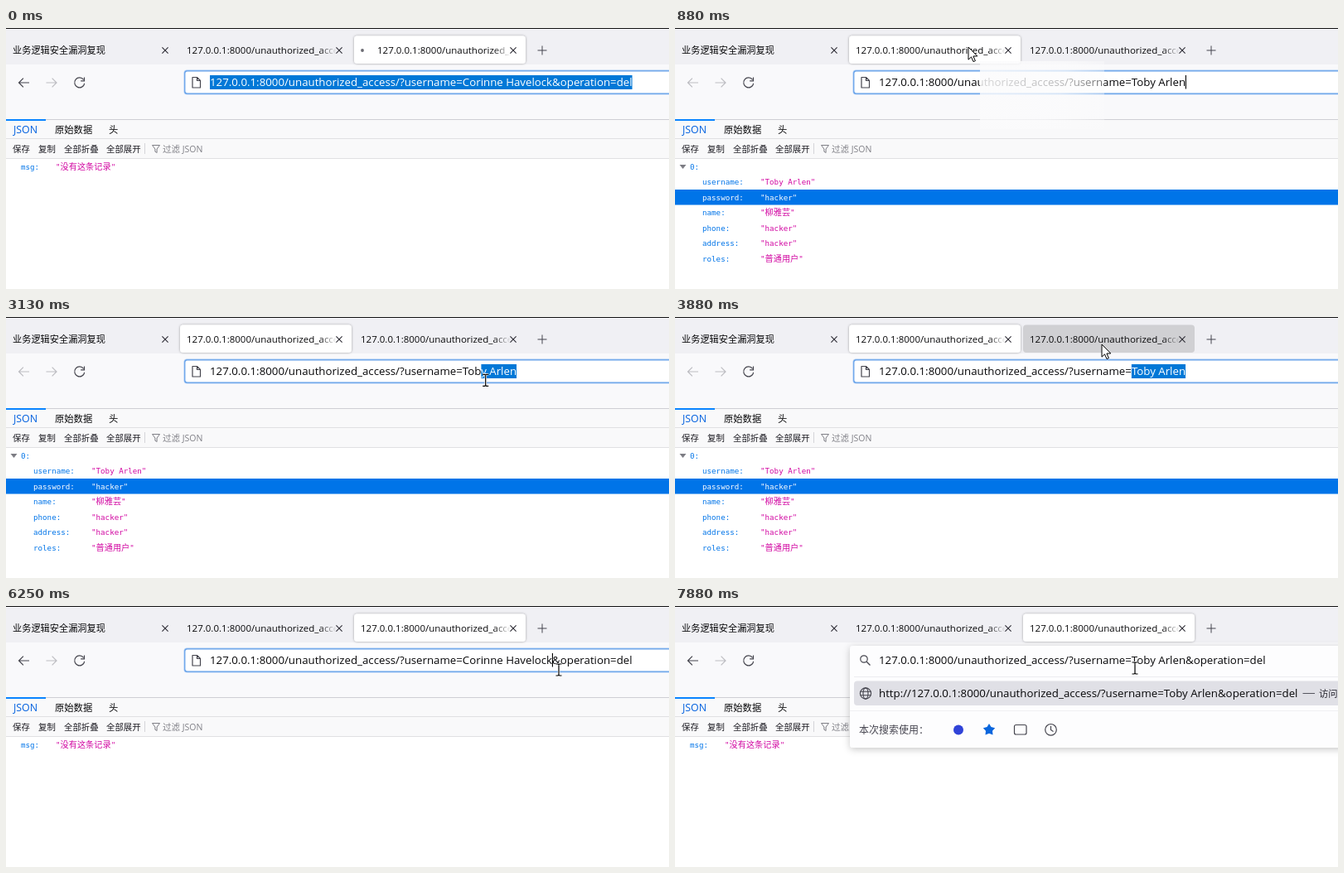
These frames come from a looping animation (800 px wide and 315 px high, 8 s). An HTML page:

```html
<!DOCTYPE html>
<html lang="zh">
<head>
<meta charset="utf-8">
<title>Browser session</title>
<style>
html, body { margin: 0; width: 100%; height: 100%; overflow: hidden; background: #fff; }
svg { display: block; width: 800px; height: 315px; }
text { font-family: "Open Sans", "Noto Sans CJK SC", "Noto Sans CJK", sans-serif; white-space: pre; }
.mono { font-family: "DejaVu Sans Mono", "Noto Sans CJK SC", "Noto Sans CJK", monospace; }
</style>
</head>
<body>
<svg id="stage" viewBox="0 0 800 315" xmlns="http://www.w3.org/2000/svg"></svg>
<script>
const LOOP = 8000, STEP = 125;
const INK = '#08080a', ICON = '#45454e', GREY = '#74747c', BLUE = '#0078d7', KEY = '#0074e8', STR = '#d208a2';
const USER = 'Toby Arlen', OTHER = 'Corinne Havelock', FULL_NAME = '柳雅芸';
const HOST = '127.0.0.1', BASE = HOST + ':8000/unauthorized_access/?username=', OP = '&operation=del';
const URL_X = 246, URL_SIZE = 13.28;

const stage = document.getElementById('stage');
const pen = document.createElement('canvas').getContext('2d');
const widthOf = s => {
  pen.font = `${URL_SIZE}px "Open Sans", sans-serif`;
  return pen.measureText(s).width;
};
const esc = s => s.replace(/&/g, '&amp;').replace(/</g, '&lt;');

const rect = (x, y, w, h, fill, extra = '') =>
  `<rect x="${x}" y="${y}" width="${w}" height="${h}" fill="${fill}" ${extra}/>`;
const line = (d, color, w = 1.1, extra = '') =>
  `<path d="${d}" fill="none" stroke="${color}" stroke-width="${w}" ${extra}/>`;
const label = (x, y, size, s, fill = INK, extra = '') =>
  `<text x="${x}" y="${y}" font-size="${size}" fill="${fill}" ${extra}>${esc(s)}</text>`;
const span = (s, fill) => `<tspan fill="${fill}">${esc(s)}</tspan>`;

const DEFS = `<defs>
  <linearGradient id="fade2" gradientUnits="userSpaceOnUse" x1="378" x2="399">
    <stop offset="0" stop-color="${INK}"/><stop offset="1" stop-color="${INK}" stop-opacity="0"/></linearGradient>
  <linearGradient id="fade3" gradientUnits="userSpaceOnUse" x1="588" x2="609">
    <stop offset="0" stop-color="${INK}"/><stop offset="1" stop-color="${INK}" stop-opacity="0"/></linearGradient>
  <radialGradient id="ghost" gradientUnits="userSpaceOnUse" cx="378" cy="48" r="155">
    <stop offset="0" stop-color="#fbfbfc" stop-opacity=".86"/><stop offset=".6" stop-color="#fbfbfc" stop-opacity=".72"/>
    <stop offset="1" stop-color="#fbfbfc" stop-opacity=".3"/></radialGradient>
  <filter id="shade" x="-5%" y="-20%" width="110%" height="140%">
    <feDropShadow dx="0" dy="0" stdDeviation="1.6" flood-color="#000" flood-opacity=".35"/></filter>
  <filter id="drop" x="-5%" y="-20%" width="110%" height="140%">
    <feDropShadow dx="0" dy="2" stdDeviation="4" flood-color="#000" flood-opacity=".22"/></filter>
</defs>`;

const cross = x => line(`M${x - 3.6} 23.4l7.2 7.2m0-7.2l-7.2 7.2`, '#2b2a33', 1.1);

function tabs(active, hover, loading) {
  let out = '';
  [2, 3].forEach(n => {
    const x = n === 2 ? 210 : 420;
    if (n === active) out += rect(x, 9.5, 207, 33.5, '#fff', 'rx="4" filter="url(#shade)"');
    else if (n === hover) out += rect(x, 9.5, 207, 33.5, '#d0d0d3', 'rx="4"');
    const shift = n === 3 && loading ? 28 : 8;
    out += label(x + shift, 31, 11.5, HOST + ':8000/unauthorized_access', `url(#fade${n})`);
    out += cross(x + 192);
  });
  if (loading) out += '<circle cx="430" cy="27" r="1.9" fill="#6a6a72"/>';
  return label(8, 31, 11.2, '业务逻辑安全漏洞复现') + cross(192) + out +
    line('M641.5 27h11m-5.5-5.5v11', ICON, 1);
}

function navIcons(canGoBack) {
  const dim = '#bdbdc2';
  return line('M28 66H15.5m5.4-5.4L15.5 66l5.4 5.4', canGoBack ? ICON : dim, 1.2) +
    line('M48.5 66H61m-5.4-5.4L61 66l-5.4 5.4', dim, 1.2) +
    line('M93.6 62.3A6 6 0 1 0 94.7 66.8M94.5 59.5v4.3h-4.3', ICON, 1.2);
}

const docIcon = line('M225 59.5h5.5l4 4v8.5h-9.5zM230.5 59.5v4h4', ICON, 1.2, 'stroke-linejoin="round"');
const lens = `<circle cx="228" cy="64" r="4.2" fill="none" stroke="${ICON}" stroke-width="1.2"/>` +
  line('M231.2 67.2l4.3 4.3', ICON, 1.3);

// from/to: selected range, caret: character index
function address({ url, from = 0, to = 0, caret = -1, focus }) {
  const at = i => URL_X + widthOf(url.slice(0, i));
  let out = '', body;
  if (to > from) out += rect(at(from), 57, at(to) - at(from), 17, BLUE);
  if (focus) body = span(url.slice(0, from), INK) + span(url.slice(from, to), '#fff') + span(url.slice(to), INK);
  else body = span(HOST, INK) + span(url.slice(HOST.length), GREY);
  out += `<text x="${URL_X}" y="70" font-size="${URL_SIZE}">${body}</text>`;
  if (caret >= 0) out += rect(at(caret) - .2, 57, 1.1, 16.5, '#000');
  return out;
}

const bar = focus => focus
  ? rect(214.5, 50.5, 600, 30, '#a9cbf5', 'rx="4"') +
    rect(215.8, 51.8, 600, 27.4, '#fff', 'rx="3" stroke="#5f9de8" stroke-width="1.2"')
  : rect(215, 51, 600, 29, '#f0f0f4', 'rx="4"');

function panel() {
  const url = 'http://' + BASE + USER + OP;
  const star = Array.from({ length: 10 }, (_, i) => {
    const r = i % 2 ? 4.2 : 7.6, a = i * Math.PI / 5 - Math.PI / 2;
    return `${(379 + r * Math.cos(a)).toFixed(1)},${(149.5 + r * Math.sin(a)).toFixed(1)}`;
  }).join(' ');
  return rect(211, 48, 620, 123, '#fdfdfe', 'rx="4" filter="url(#drop)"') +
    rect(216, 85, 590, 1, '#ececf0') +
    rect(216, 90.5, 600, 29.5, '#e0e0e6', 'rx="4"') + rect(211, 126, 620, 1, '#f0f0f3') +
    lens +
    `<g fill="none" stroke="${ICON}" stroke-width="1.1"><circle cx="230" cy="105.5" r="6.6"/>` +
    '<ellipse cx="230" cy="105.5" rx="3" ry="6.6"/><path d="M223.6 103.3h12.8m-12.8 4.4h12.8"/></g>' +
    label(URL_X, 110, URL_SIZE, url) +
    rect(757.5, 105, 14.5, 1, '#55555f') + label(777, 109.5, 11.3, '访问', '#2b2a33') +
    label(222, 154, 12, '本次搜索使用：', '#45444f') +
    '<circle cx="342" cy="149.5" r="6" fill="#3043d8"/>' +
    `<polygon points="${star}" fill="#0a66dd"/>` +
    `<g fill="none" stroke="${ICON}" stroke-width="1.2"><rect x="409.5" y="143.5" width="14.5" height="11.5" rx="2"/>` +
    '<circle cx="453.5" cy="149.3" r="6.8"/><path d="M453.5 144.8v4.7l3 2"/></g>';
}

const viewer = rect(0, 110, 800, 47, '#f9f9fa') + rect(0, 110, 800, 1, '#cfcfd4') +
  rect(0, 110, 48, 2, '#0a84ff') + rect(0, 133, 800, 1, '#e0e0e2') + rect(0, 157, 800, 1, '#e0e0e2') +
  label(9, 127, 12.4, 'JSON', '#0060df') + label(59, 127, 11.3, '原始数据') + label(124, 127, 11.3, '头') +
  [[8, '保存'], [39, '复制'], [70, '全部折叠'], [121, '全部展开']].map(([x, s]) => label(x, 149.5, 10.4, s, '#1c1b22')).join('') +
  rect(167, 139, 1, 13, '#d5d5d9') +
  line('M176.5 141.5h9l-3.4 4.5v4.5l-2.2-1.3v-3.2z', '#808087', 1, 'stroke-linejoin="round"') +
  label(189, 149.5, 10.5, '过滤 JSON', '#808087');

const mono = (x, y, s, fill, cjk) =>
  `<text class="mono" x="${x}" y="${y}" font-size="9.2" fill="${fill}">` +
  (cjk ? `"<tspan font-size="10.2">${s}</tspan>"` : esc(s)) + '</text>';

const message = mono(18, 170.5, 'msg:', KEY) + mono(60, 170.5, '没有这条记录', STR, true);

const record = '<path d="M5.5 165h8l-4 5z" fill="#7d7d84"/>' + mono(18, 170.5, '0:', KEY) +
  [['username', USER], ['password', 'hacker'], ['name', FULL_NAME], ['phone', 'hacker'], ['address', 'hacker'], ['roles', '普通用户']]
    .map(([key, value], i) => {
      const y = 189 + i * 18.5, chosen = i === 1, cjk = value.charCodeAt(0) > 255;
      return (chosen ? rect(0, 195, 800, 18.5, '#0074e8') : '') +
        mono(33, y, key + ':', chosen ? '#fff' : KEY) +
        mono(103, y, cjk ? value : `"${value}"`, chosen ? '#fff' : STR, cjk);
    }).join('');

// step, x, y of the pointer's hot spot
const PATH = [
  [2, 470, 70], [5, 354, 23], [14, 354, 23], [17, 436, 51], [21, 609, 73], [22, 609, 73],
  [23, 638, 77], [26, 549, 76], [27, 549, 76], [31, 515, 33], [34, 515, 33], [40, 637, 76],
  [41, 641, 76], [48, 667, 77], [51, 667, 77], [55, 555, 75], [64, 555, 75]
];

function pointerAt(k) {
  const i = PATH.findIndex(p => p[0] > k);
  const [a, x, y] = PATH[i - 1], [b, u, v] = PATH[i], f = (k - a) / (b - a);
  return [x + (u - x) * f, y + (v - y) * f];
}

function pointer(x, y) {
  const beam = 'M-3.5-7h2.5l1 .8 1-.8h2.5M0-6.5v13M-3.5 7h2.5l1-.8 1 .8h2.5';
  const shape = y > 53
    ? line(beam, '#fff', 2.6) + line(beam, '#000', 1.2)
    : '<path d="M0 0v15.2l3.5-3.3 2.5 5.7 2.4-1-2.5-5.6h4.9z" fill="#fff" stroke="#000" stroke-width="1"/>';
  return `<g transform="translate(${x.toFixed(1)} ${y.toFixed(1)})">${shape}</g>`;
}

function urlState(k, x) {
  const mine = BASE + USER, theirs = BASE + OTHER + OP, start = BASE.length;
  const dragFrom = (url, end) => {
    let i = end;
    while (i > start && URL_X + widthOf(url.slice(0, i - 1)) > x - 8) i--;
    return i;
  };
  if (k < 5) return { url: theirs, to: theirs.length, focus: true };
  if (k < 23) {
    const on = k < 10 || (k >= 15 && k < 19);
    return { url: mine, caret: on ? mine.length : -1, focus: true };
  }
  if (k < 32) {
    const from = k > 25 ? start : dragFrom(mine, mine.length);
    return { url: mine, from, to: mine.length, focus: true };
  }
  if (k < 50) return { url: theirs, focus: false };
  if (k < 59) {
    const end = start + OTHER.length;
    if (k < 52) return { url: theirs, caret: end, focus: true };
    return { url: theirs, from: k > 54 ? start : dragFrom(theirs, end), to: end, focus: true };
  }
  return { url: mine + OP, caret: k < 62 ? mine.length : -1, focus: true };
}

function draw(k) {
  const [x, y] = k < 2 ? [0, 0] : pointerAt(k);
  const onSecond = k >= 5 && k < 32, open = k >= 60;
  const hover = k === 4 ? 2 : k >= 30 && k < 32 ? 3 : 0;
  const state = urlState(k, x);
  stage.innerHTML = DEFS + rect(0, 0, 800, 315, '#fff') + rect(0, 0, 800, 44, '#f0f0f4') +
    rect(0, 44, 800, 66, '#f9f9fb') + rect(0, 0, 800, 1, '#111') +
    tabs(onSecond ? 2 : 3, hover, k < 1) + navIcons(!onSecond) +
    viewer + (onSecond ? record : message) +
    (open ? panel() : bar(state.focus) + docIcon) + address(state) +
    (k >= 6 && k < 10 ? rect(368, 40, 150, 82, 'url(#ghost)', `opacity="${k < 8 ? 1 : (10 - k) / 3}"`) : '') +
    (k < 2 ? '' : pointer(x, y));
}

let shown = -1;
const origin = performance.now();
function tick(now) {
  const k = Math.floor((Math.max(0, now - origin) % LOOP) / STEP);
  if (k !== shown) draw(shown = k);
  requestAnimationFrame(tick);
}
tick(origin);
</script>
</body>
</html>
```
